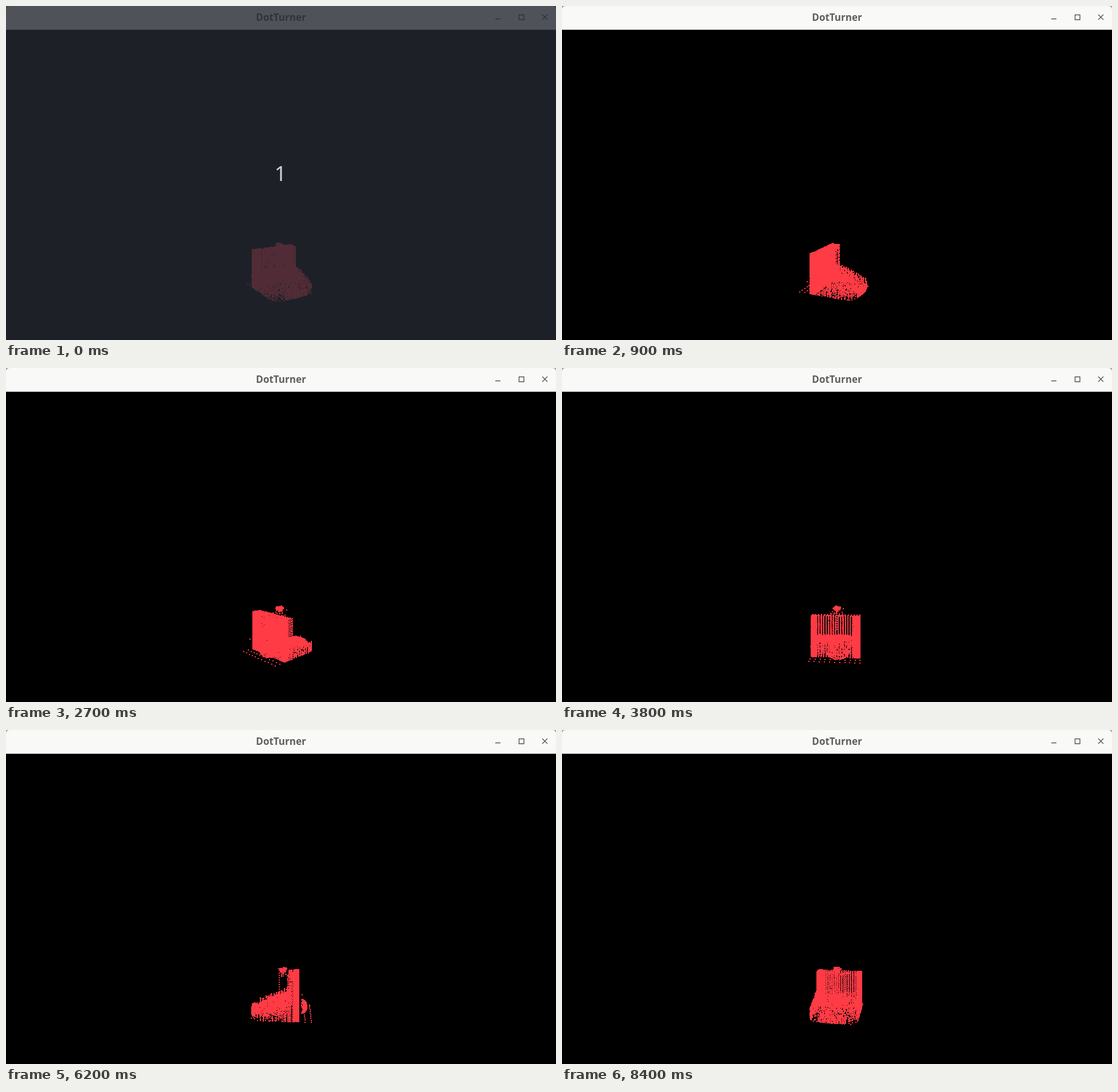
An HTML page with a canvas for the animation above (8.6 s loop, 960x584 px).

```html
<!DOCTYPE html>
<html lang="en">
<head>
<meta charset="utf-8">
<title>DotTurner</title>
<style>
  html, body { margin: 0; width: 100%; height: 100%; overflow: hidden; background: #000; }
  canvas { display: block; }
</style>
</head>
<body>
<canvas id="stage" width="960" height="584"></canvas>
<script>
const ctx = document.getElementById('stage').getContext('2d');

const LOOP = 8600, STEP = 100, LAST_STEP = 84;
const START_ANGLE = 32, DEGREES_PER_STEP = 3.78;
const CENTER_X = 480, HORIZON = 313, CAMERA = 487, GROUND = 180.5;
const WALL_TOP = 67, HALF = 40;

let seed = 7;
function random() {
  seed = (seed * 16807) % 2147483647;
  return seed / 2147483647;
}

// Each point is [forward, sideways, height] in the model's own axes.
const points = [];
const add = (f, u, y) => points.push([f, u, y]);

function range(from, to, step, fn) {
  for (let v = from; v <= to + 1e-6; v += step) fn(v);
}

function buildWall() {
  range(-31, -23, 2, f => {
    range(-HALF, HALF, 4, u => range(0, WALL_TOP, 3, y => {
      if (random() > 0.04) add(f, u, y);
    }));
    // Dense end pillars
    range(0, WALL_TOP, 2, y => {
      range(-HALF, -29, 2, u => add(f, u, y));
      range(34, HALF, 2, u => add(f, u, y));
    });
  });
  // Dotted end panels and top edge
  range(-21, -13, 2.6, f => {
    for (const u of [-HALF, HALF]) range(0, WALL_TOP, 2.6, y => add(f, u, y));
    range(-HALF, HALF, 5, u => add(f, u, WALL_TOP - 2));
  });
}

const footHeight = f => 26 - 0.38 * f;
const footHalf = f => f < 25 ? HALF : HALF - 12 * ((f - 25) / 25) ** 2;

function buildFoot() {
  range(-16, 49, 3, f => {
    const half = footHalf(f), top = footHeight(f);
    range(-half, half, 3.2, u => {
      const arch = f > 26 && Math.abs(u) > 21 && Math.abs(u) < 35;
      range(0, top, 2.8, y => {
        const density = y > top - 9 ? 0.6 : y < 2 ? 0.45 : 0.2;
        if (random() < density * (arch ? 0.3 : 1)) add(f, u, y);
      });
    });
  });
  // Flanks with uneven upright rods
  range(-14, 44, 5, f => {
    for (const side of [-1, 1]) {
      range(0, footHeight(f) + 4 * random(), 2, y => {
        if (random() < 0.8) add(f, side * footHalf(f), y);
      });
    }
  });
  // Rounded nose
  range(-22, 22, 2.2, u => {
    range(1, 13 - u * u / 90, 2, y => add(50 - u * u / 150, u, y));
  });
}

function buildHead() {
  for (let i = 0; i < 90; i++) {
    const a = random() * Math.PI * 2, r = 7 * Math.sqrt(random());
    add(-3 + r * Math.cos(a), r * Math.sin(a), 77 - random() * (11 - r));
  }
  for (let i = 0; i < 12; i++) add(-4 + 18 * (random() - 0.5), 24 * (random() - 0.5), 63 + 10 * random());
  range(36, 70, 4, y => add(3, 0, y));
}

function buildRear() {
  range(-HALF, HALF, HALF / 5, u => {
    add(-51, u, 0);
    add(-41, u, 0);
  });
  for (const u of [-HALF, HALF]) add(-37, u, 19);
  for (let i = 0; i < 260; i++) {
    const a = random() * Math.PI * 2, r = Math.sqrt(random());
    add(-35 - 10 * Math.sqrt(1 - r * r), -4 + 18 * r * Math.cos(a), 10 + 11 * r * Math.sin(a));
  }
}

buildWall();
buildFoot();
buildHead();
buildRear();

function drawModel(angle) {
  const s = Math.sin(angle), c = Math.cos(angle);
  ctx.fillStyle = '#ff3b45';
  for (const [f, u, y] of points) {
    const scale = CAMERA / (CAMERA - (f * c - u * s));
    const px = CENTER_X + scale * (f * s + u * c);
    const py = HORIZON + scale * (GROUND - y);
    ctx.fillRect(Math.round(px - 1), Math.round(py - 1), 2, 2);
  }
}

function drawText(text, font, color, x, y) {
  ctx.font = font;
  ctx.fillStyle = color;
  ctx.textAlign = 'center';
  ctx.fillText(text, x, y);
}

function drawTitleBar() {
  ctx.fillStyle = '#a0a0a0';
  ctx.fillRect(0, 0, 960, 12);
  ctx.fillStyle = '#f9f9f7';
  ctx.beginPath();
  ctx.roundRect(0, 0, 960, 41, [6, 6, 0, 0]);
  ctx.fill();
  ctx.fillStyle = '#8c8c8a';
  ctx.fillRect(0, 41, 960, 1);
  drawText('DotTurner', 'bold 17px "Noto Sans", "Open Sans", sans-serif', '#5f5f5b', 480, 26);

  ctx.strokeStyle = '#555552';
  ctx.lineWidth = 1.4;
  ctx.beginPath();
  ctx.moveTo(854, 22.5);
  ctx.lineTo(863, 22.5);
  ctx.rect(895.5, 15.5, 8.5, 8.5);
  ctx.moveTo(936, 15);
  ctx.lineTo(945, 24);
  ctx.moveTo(945, 15);
  ctx.lineTo(936, 24);
  ctx.stroke();
}

function drawCountdown() {
  ctx.fillStyle = 'rgba(38, 41, 50, 0.8)';
  ctx.fillRect(0, 0, 960, 584);
  drawText('1', '36px "Noto Sans", "Open Sans", sans-serif', '#d0d1d2', 479, 306);
}

function draw(time) {
  const step = Math.min(Math.floor((time % LOOP) / STEP), LAST_STEP);
  ctx.fillStyle = '#000';
  ctx.fillRect(0, 0, 960, 584);
  drawTitleBar();
  drawModel((START_ANGLE + DEGREES_PER_STEP * step) * Math.PI / 180);
  if (step === 0) drawCountdown();
}

const start = performance.now();
function tick() {
  draw(performance.now() - start);
  requestAnimationFrame(tick);
}
tick();
</script>
</body>
</html>
```
